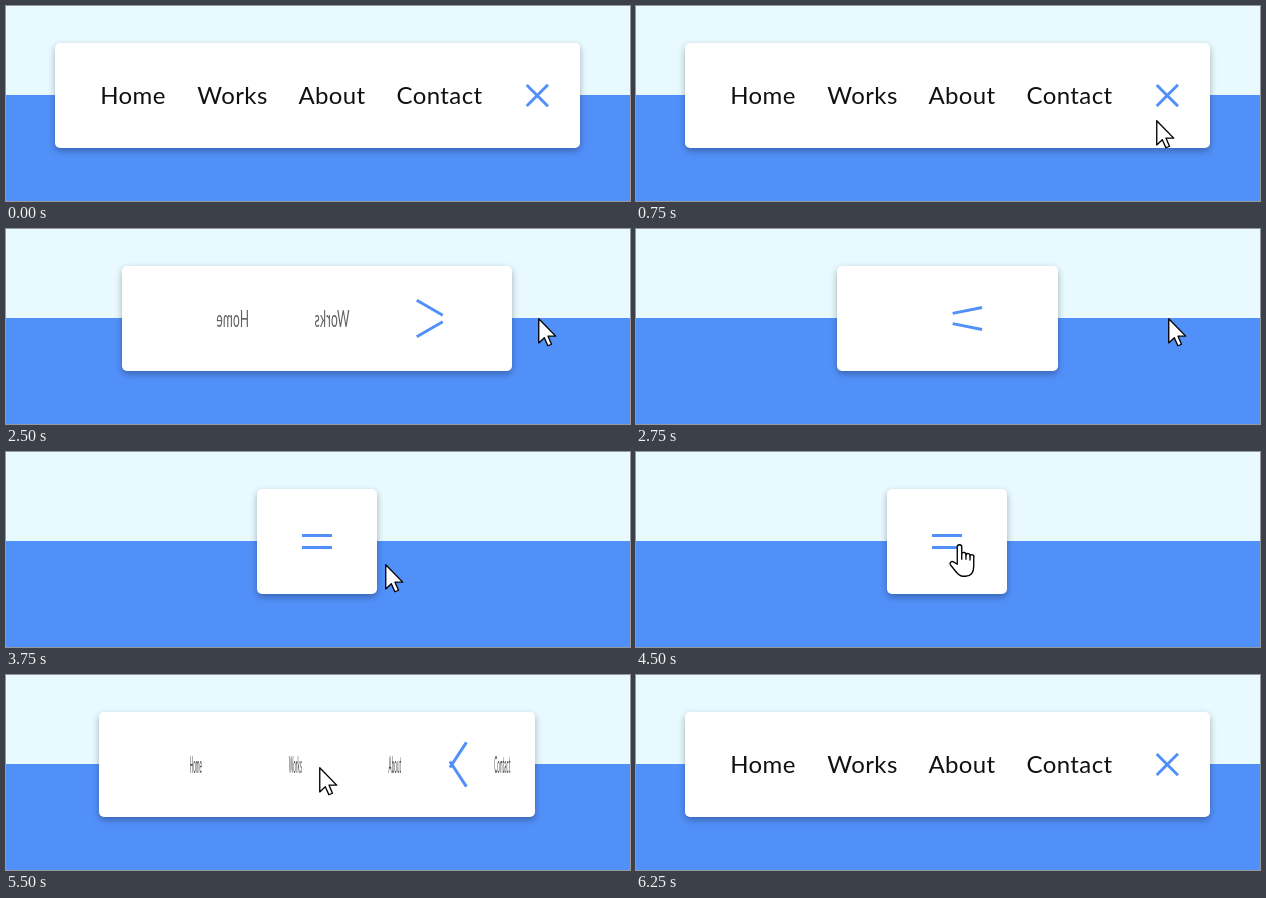
These frames come from a looping animation (624 by 195 pixels, 7000 ms). An HTML page:

```html
<!DOCTYPE html>
<html lang="en">
<head>
<meta charset="utf-8">
<title>Expanding navigation</title>
<style>
html, body { margin: 0; width: 100%; height: 100%; overflow: hidden; }
body { position: relative; background: linear-gradient(#e8faff 89px, #5290f9 89px); }
#nav {
  position: absolute; top: 37px; height: 105px;
  background: #fff; border-radius: 5px;
  box-shadow: 0 3px 7.5px rgba(0, 0, 0, .3);
}
svg { position: absolute; left: 0; top: 0; }
text { font: 24px Lato, "Open Sans", sans-serif; letter-spacing: .4px; text-anchor: middle; fill: #111; }
.line { fill: #5290f9; }
.cursor { fill: #fff; stroke: #000; stroke-width: .9; stroke-linejoin: round; }
</style>
</head>
<body>
<div id="nav"></div>
<svg width="624" height="195" viewBox="0 0 624 195">
  <clipPath id="inside"><rect id="clip" y="37" height="105" rx="5"/></clipPath>
  <g clip-path="url(#inside)">
    <g id="words">
      <text>Home</text><text>Works</text><text>About</text><text>Contact</text>
    </g>
    <g id="icon">
      <rect x="-22.5" y="67" width="45" height="45" fill="#fff"/>
      <rect class="line" x="-15" y="-1.5" width="30" height="3"/>
      <rect class="line" x="-15" y="-1.5" width="30" height="3"/>
    </g>
  </g>
  <g id="arrow" class="cursor">
    <path d="M.5 .5V16.6L4.2 13.1L6.6 18.5L9 17.5L6.7 12.1H11.8Z"/>
  </g>
  <g id="hand" class="cursor">
    <path d="M5.5 13.5V2a1.5 1.5 0 0 1 3 0V6.8a1.4 1.4 0 0 1 2.8 .5a1.4 1.4 0 0 1 2.7 .7a1.3 1.3 0 0 1 2.5 1V14.500c0 4.500-2 7-5.500 7H9C6 21.500 4.500 18 1 14c-1-1.500 .5-2.900 2-2.100Z"/>
    <path fill="none" d="M8.500 6.800V10.500M11.300 7.300V10.500M14 8V11"/>
  </g>
</svg>
<script>
const LOOP = 7000, TICK = 250, DURATION = 600;
const CLOSE_AT = 2300, OPEN_AT = 5032;
const PADDING = 30, ICON = 45;
const wordOffsets = [48, 147.5, 247, 354.5];

// start time, cursor shape, left, top
const cursorSteps = [
  [0, null, 0, 0],
  [250, 'arrow', 489, 177],
  [500, 'arrow', 504, 133],
  [750, 'arrow', 520, 114],
  [1000, 'hand', 526, 103],
  [1250, 'hand', 530, 104],
  [1500, 'hand', 533, 91],
  [1750, 'hand', 532, 89],
  [2500, 'arrow', 532, 89],
  [3750, 'arrow', 379, 112],
  [4000, 'hand', 296, 104],
  [4250, 'hand', 320, 104],
  [4500, 'hand', 313, 92],
  [5250, 'arrow', 313, 92],
  [5750, 'hand', 313, 92],
  [6000, 'arrow', 335, 167],
  [6250, null, 0, 0]
];

const byId = id => document.getElementById(id);
const clamp = v => Math.min(1, Math.max(0, v));
const move = (el, value) => el.setAttribute('transform', value);
const nav = byId('nav'), clip = byId('clip'), icon = byId('icon');
const words = [...byId('words').children];
const lines = [...icon.querySelectorAll('.line')];
const cursors = { arrow: byId('arrow'), hand: byId('hand') };

function drawNav(open) {
  const width = 120 + 405 * open;
  const left = Math.round(311.25 - width / 2);
  const right = Math.round(311.25 + width / 2);
  nav.style.left = left + 'px';
  nav.style.width = right - left + 'px';
  clip.setAttribute('x', left);
  clip.setAttribute('width', right - left);

  // The list and the icon sit centred together inside the padding.
  const content = width - 2 * PADDING;
  const list = content * open;
  const start = left + PADDING + Math.max(0, (content - list - ICON) / 2);
  const iconX = Math.min(start + list + ICON / 2, right - 48.5);

  const squeeze = Math.cos(2 * Math.PI * open);
  words.forEach((word, i) => {
    move(word, `translate(${start + wordOffsets[i]} 98) scale(${squeeze} 1)`);
    word.setAttribute('opacity', open);
  });

  move(icon, `translate(${iconX} 0)`);
  lines.forEach((line, i) => {
    const side = i ? 1 : -1;
    move(line, `translate(0 ${89.5 + 6 * side}) rotate(${765 * open * side}) translate(0 ${-8.25 * open * side})`);
  });
}

function drawCursor(time) {
  const [, shape, x, y] = cursorSteps.filter(step => step[0] <= time).pop();
  for (const name in cursors) {
    cursors[name].style.display = name === shape ? '' : 'none';
    move(cursors[name], `translate(${x} ${y}) scale(1.5)`);
  }
}

const begin = performance.now();
function frame() {
  const elapsed = (performance.now() - begin) % LOOP;
  const time = Math.floor(elapsed / TICK) * TICK;
  const closing = clamp(1 - (time - CLOSE_AT) / DURATION);
  const opening = clamp((time - OPEN_AT) / DURATION);
  drawNav(Math.max(closing, opening));
  drawCursor(time);
  requestAnimationFrame(frame);
}
frame();
</script>
</body>
</html>
```
